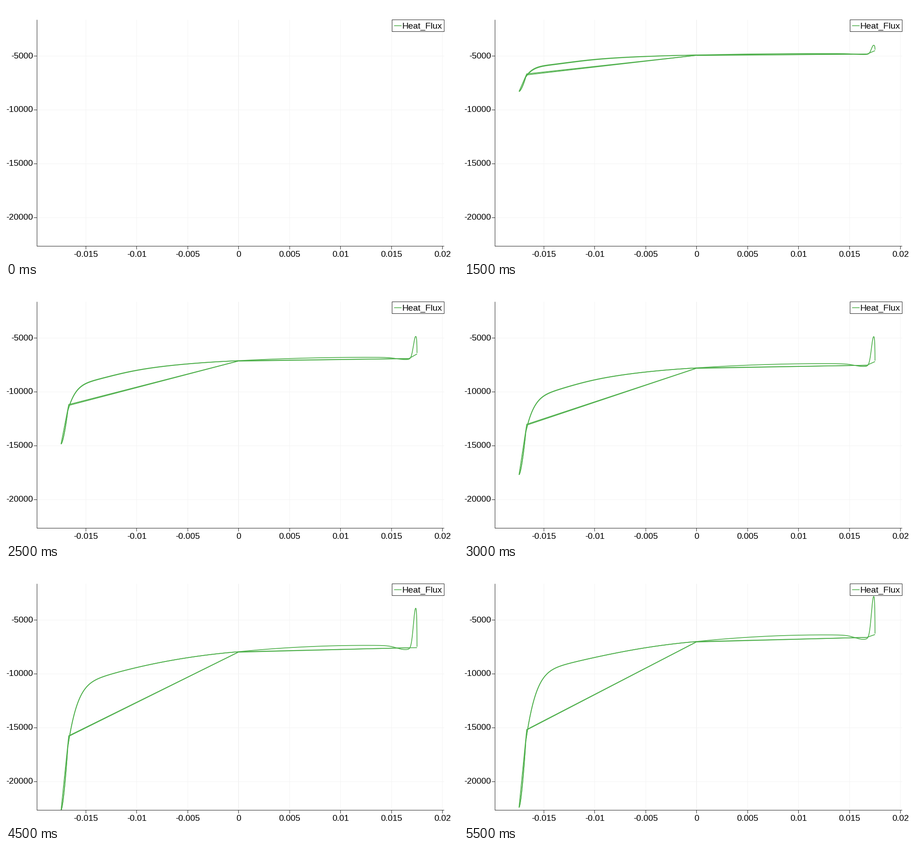
Write a matplotlib script that moves like this. It is 998 by 561 pixels and loops after 6000 ms.

```python
import numpy as np
import matplotlib.pyplot as plt
from matplotlib.animation import FuncAnimation
from matplotlib.patches import Rectangle

WIDTH, HEIGHT, DPI = 998, 561, 100
PX = 72 / DPI  # points per pixel
FRAMES, INTERVAL = 12, 500
GREEN = "#4daf4a"
GRID = "#f3f3f3"
INK = "#222222"
FONT = "Liberation Sans"

ZERO_FLUX = -8.3  # pixel height of flux 0, where everything starts
TIP_X, CORNER_X, MID_X, BEND_X, PEAK_X, END_X = 121, 136, 513, 889, 904, 907


def motion(*heights):
    """Smooth path from zero flux through heights at five key times (s)."""
    times = np.array([1, 2, 3, 4.5, 5.5])
    speed = np.polyfit(times, (np.array(heights) - ZERO_FLUX) / times, 4)
    return lambda t: ZERO_FLUX + t * np.polyval(speed, t)


mid_at = motion(73.3, 137, 176, 180, 157.5)
tip_at = motion(111, 268, 412, 530.5, 524)
peak_at = motion(64, 100, 107, 84, 58)
end_at = motion(69, 123.5, 162, 171, 142)


def left_shape(x, t):
    """Drop below the middle: 0 at the middle, 1 at the tip."""
    w = MID_X - x
    d = np.maximum(x - CORNER_X, 0)
    slope = 0.00023 * w + 9.2e-7 * w ** 2
    steep = 0.382 * np.exp(-0.047 * d - 0.00022 * d ** 2)
    early = max(0.127 - 0.0273 * t, -0.008)
    bulge = early * (d / 60) ** 2 * np.exp(2 - d / 30)
    hook = 1 - 0.4 * (np.minimum(x - TIP_X, 15) / 15) ** 1.55
    return np.where(x < CORNER_X, hook, slope + steep + bulge)


def hump(x):
    r = (x - MID_X) / 282
    return r * (2 - r) - 0.57 * np.exp(-0.5 * ((x - 880) / 18) ** 2)


def right_profile(x, mid, depth, peak, end):
    rise = 0.04 * depth
    height = mid - rise * hump(PEAK_X) - peak
    spike = height * np.exp(-0.5 * ((x - PEAK_X) / 4.9) ** 2)
    r = np.clip((x - PEAK_X) / (END_X - PEAK_X), 0, 1)
    fall = end + (peak - end) * np.sqrt(1 - r ** 3)
    return np.where(x < PEAK_X, mid - rise * hump(x) - spike, fall)


fig = plt.figure(figsize=(WIDTH / DPI, HEIGHT / DPI), dpi=DPI, facecolor="white")
ax = fig.add_axes([0, 0, 1, 1])
# Whole numbers fall on pixel centres.
ax.set_xlim(-0.5, WIDTH - 0.5)
ax.set_ylim(HEIGHT - 0.5, -0.5)
ax.axis("off")


def line(xs, ys, color=INK, width=1.0, z=2):
    return ax.plot(xs, ys, color=color, lw=width * PX, zorder=z, snap=False,
                   solid_capstyle="butt", solid_joinstyle="round")[0]


def label(x, y, text, ha, size=19, z=3):
    ax.text(x, y, text, ha=ha, va="baseline", fontsize=size * PX,
            family=FONT, color="black", zorder=z)


for k in range(-3, 5):
    x = round(513.4 + 112.45 * k)
    line([x, x], [30, 530], "#e9e9e9" if k == 0 else GRID, z=1)
    line([x, x], [530, 537])
    label(x, 554, f"{0.005 * k:.3f}".rstrip("0").rstrip(".") if k else "0", "center")
for k in range(1, 5):
    y = round(110.4 + 118.75 * (k - 1))
    line([68, 967], [y, y], GRID, z=1)
    line([61, 68], [y, y])
    label(59.5, y + 5, str(-5000 * k), "right")
line([68, 68], [30, 530.5], z=4)
line([67.5, 967], [530, 530], z=4)

ax.add_patch(Rectangle((852, 30), 115, 26, fc="white", ec=INK, lw=PX, zorder=6, snap=False))
line([856.5, 873], [43, 43], GREEN, 1.6, z=7)
label(874.3, 49, "Heat_Flux", "left", 19.4, z=7)

LEFT_X = np.linspace(TIP_X, MID_X, 393)
RIGHT_X = np.concatenate([np.linspace(MID_X, 890, 378), np.linspace(890, END_X, 171)])
upper, upper_twin, right, lower, lower_twin, back, back_twin = curves = [
    line([], [], GREEN, 1.7, z=3) for _ in range(7)]
plot_area = Rectangle((68, 30), 899, 500.5, transform=ax.transData)
for curve in curves:
    curve.set_clip_path(plot_area)


def update(frame):
    if frame == 0:
        for curve in curves:
            curve.set_data([], [])
        return curves
    t = frame * INTERVAL / 1000
    mid, tip, peak, end = mid_at(t), tip_at(t), peak_at(t), end_at(t)
    depth = tip - mid
    corner, bend = mid + 0.53 * depth, mid - 0.025 * depth
    half_gap = max(2.9 - 0.58 * t, 0) / 2

    # The loop is a pair of lines that close up over time.
    left = mid + depth * left_shape(LEFT_X, t)
    spread = half_gap * 0.7 * (MID_X - LEFT_X) / (MID_X - CORNER_X) * (LEFT_X > CORNER_X)
    upper.set_data(LEFT_X, left - spread)
    upper_twin.set_data(LEFT_X, left + spread)
    right.set_data(RIGHT_X, right_profile(RIGHT_X, mid, depth, peak, end - 2))
    lower.set_data([MID_X, 138, TIP_X], [mid + 0.6, corner - half_gap, tip])
    lower_twin.set_data([MID_X, 140], [mid + 0.6, corner + half_gap])
    back.set_data([END_X, BEND_X, MID_X], [end, bend, mid + 1])
    back_twin.set_data([BEND_X, MID_X], [bend, mid + 0.2])
    return curves


anim = FuncAnimation(fig, update, frames=FRAMES, interval=INTERVAL,
                     init_func=lambda: update(0), repeat=True, repeat_delay=0)
plt.show()
```
